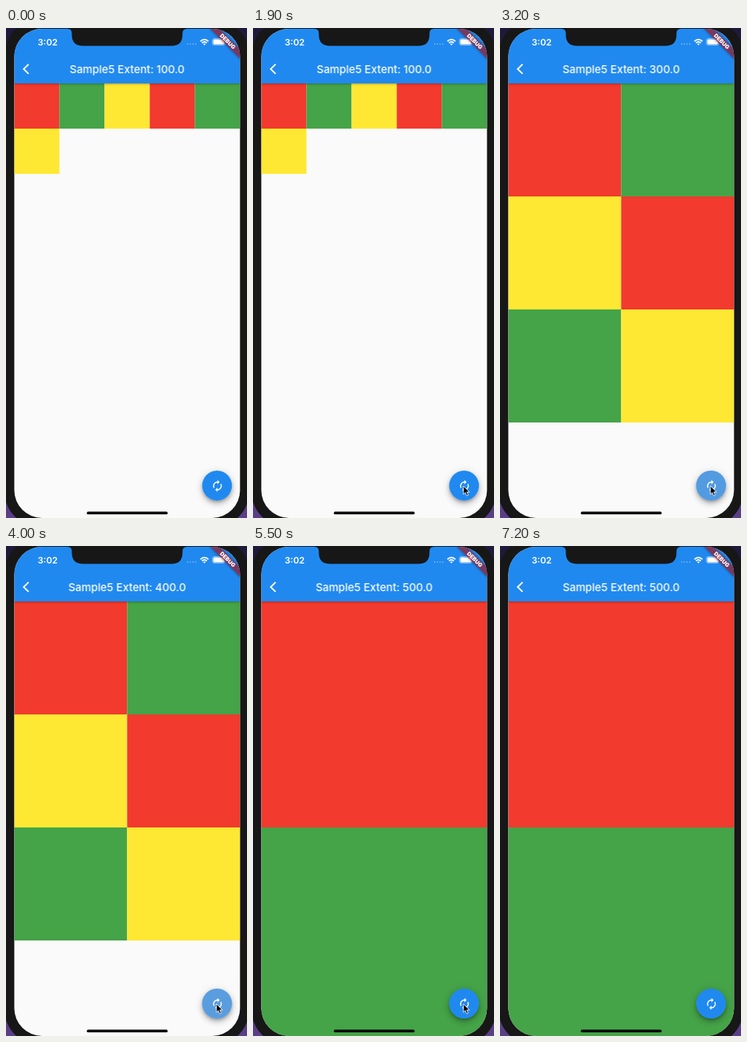
Write an HTML page that moves like this. It is 331x672 px and loops after 7300 ms.

```html
<!DOCTYPE html>
<html lang="en">
<head>
<meta charset="utf-8">
<title>Grid extent demo</title>
<style>
  :root { --loop: 7300ms; --blue: #2089f0; --body: #171717; }
  * { box-sizing: border-box; }
  html, body { margin: 0; width: 331px; height: 672px; overflow: hidden; }
  body {
    position: relative;
    background: linear-gradient(#1d1a3a, #2b2250 50%, #5a3f86);
    font-family: Inter, Roboto, sans-serif;
  }
  body > *, .screen > * { position: absolute; }

  .phone {
    left: -2px; top: -11px; width: 336px; height: 695px;
    border-radius: 48px; background: var(--body);
  }
  .screen {
    left: 11px; top: 1px; width: 310px; height: 671px;
    border-radius: 38px; overflow: hidden; background: #fafafa;
    transform: translateX(.4px);
  }

  .grid { top: 75px; width: 310px; display: flex; flex-wrap: wrap; }
  .grid i {
    width: 20%; aspect-ratio: 1;
    animation: columns var(--loop) step-end infinite;
  }
  .grid i:nth-child(3n+1) { background: #f23a2e; }
  .grid i:nth-child(3n+2) { background: #45a348; }
  .grid i:nth-child(3n)   { background: #ffe833; }

  .bar {
    top: 0; width: 310px; height: 75px; background: var(--blue);
    box-shadow: 0 1px 3px rgba(0, 0, 0, .32);
  }
  .titles {
    left: 40px; top: 46px; width: 230px; height: 20px; overflow: hidden;
    color: #fff; font-size: 14.85px; font-weight: 500; line-height: 20px;
    text-align: center; white-space: nowrap;
  }
  .titles div { animation: titles var(--loop) step-end infinite; }

  .fab, .shade {
    left: 258px; top: 606px; width: 41px; height: 41px; border-radius: 50%;
  }
  .shade {
    box-shadow: 0 2.5px 4px -1px rgba(0, 0, 0, .28), 0 4.5px 8px rgba(0, 0, 0, .2),
      0 1px 13px rgba(0, 0, 0, .1);
  }
  .fab { background: var(--blue); overflow: hidden; }
  .fab::before {
    content: ""; position: absolute; inset: 0; background: #c2c2c2; opacity: 0;
    animation: press var(--loop) linear infinite;
  }
  .fab svg { position: absolute; left: 11.5px; top: 11.5px; }

  .banner {
    left: 262.6px; top: 13px; width: 60px; height: 9px;
    background: rgba(160, 20, 28, .68); box-shadow: 0 0 4px rgba(0, 0, 0, .45);
    transform: rotate(45deg);
    color: #fff; font-size: 7.6px; font-weight: 900; line-height: 9px; text-align: center;
  }

  .overlay { left: 0; top: 0; }
  .cursor {
    left: 288px; top: 627px;
    animation: pointer var(--loop) ease-in-out infinite;
  }

  /* Taps land at 2050, 3050, 3920 and 5080 ms. */
  @keyframes columns {
    0% { width: 20%; }
    28.08% { width: 33.3333%; }
    41.78%, 53.7% { width: 50%; }
    69.59%, 100% { width: 100%; }
  }
  @keyframes titles {
    0% { transform: translateY(0); }
    28.08% { transform: translateY(-20px); }
    41.78% { transform: translateY(-40px); }
    53.7% { transform: translateY(-60px); }
    69.59%, 100% { transform: translateY(-80px); }
  }
  @keyframes press {
    0%, 26.58%, 32.74%, 40.14%, 46.3%, 52.33%, 58.49%, 68.15%, 74.32%, 100% { opacity: 0; }
    28.22%, 30%, 41.78%, 43.56%, 53.97%, 55.75%, 69.79%, 71.58% { opacity: .36; }
  }
  @keyframes pointer {
    0%, 17%, 88%, 100% { transform: translate(46px, 22px); }
    24%, 81.5% { transform: none; }
  }
</style>
</head>
<body>
<div class="phone"></div>

<div class="screen">
  <div class="grid"><i></i><i></i><i></i><i></i><i></i><i></i></div>
  <div class="bar"></div>
  <div class="titles">
    <div>
      Sample5 Extent: 100.0<br>
      Sample5 Extent: 200.0<br>
      Sample5 Extent: 300.0<br>
      Sample5 Extent: 400.0<br>
      Sample5 Extent: 500.0
    </div>
  </div>
  <div class="shade"></div>
  <div class="fab">
    <svg width="18" height="18" viewBox="0 0 24 24" fill="#fff">
      <path d="M12 6v3l4-4-4-4v3c-4.42 0-8 3.58-8 8 0 1.57.46 3.03 1.24 4.26L6.7 14.8c-.45-.83-.7-1.79-.7-2.8 0-3.31 2.69-6 6-6zm6.76 1.74L17.3 9.2c.44.84.7 1.79.7 2.8 0 3.31-2.69 6-6 6v-3l-4 4 4 4v-3c4.42 0 8-3.58 8-8 0-1.57-.46-3.03-1.24-4.26z"/>
    </svg>
  </div>
</div>

<svg class="overlay" width="331" height="672" fill="#fff">
  <path fill="#171717" d="M84 0V1Q90.4 1 90.4 7V9Q90.4 24.6 106 24.6H227Q242.4 24.6 242.4 9V7Q242.4 1 249 1V0Z"/>
  <text x="43.5" y="23.6" font-size="12.3" font-weight="600">3:02</text>
  <g opacity=".35">
    <circle cx="249.5" cy="22" r="1"/><circle cx="253.2" cy="22" r="1"/>
    <circle cx="256.9" cy="22" r="1"/><circle cx="260.6" cy="22" r="1"/>
  </g>
  <g fill="none" stroke="#fff">
    <path stroke-width="1.8" d="M267 18.2Q272.5 13.4 278 18.2M269.1 20.5Q272.5 17.6 275.9 20.5"/>
    <path stroke-width="2" d="M31 49.8 24.3 56.3 31 62.8"/>
    <rect x="283.5" y="14.5" width="17.5" height="9" rx="2.5" stroke-opacity=".45"/>
  </g>
  <path d="M270.7 21.9Q272.5 20.4 274.3 21.9L272.5 23.8Z"/>
  <rect x="284.6" y="15.6" width="15.2" height="6.9" rx="1.5"/>
  <rect x="111" y="663.3" width="111" height="3.8" rx="1.9" fill="#0b0b0b"/>
</svg>

<div class="screen" style="background:none">
  <div class="banner">DEBUG</div>
</div>

<svg class="cursor" width="12" height="17" viewBox="-1 -1 12 17">
  <path d="M0 0V11.5L2.6 9.1 4.4 13.4 6.5 12.5 4.7 8.3H8.3Z" stroke="#fff" stroke-width=".9" stroke-linejoin="round"/>
</svg>
</body>
</html>
```
